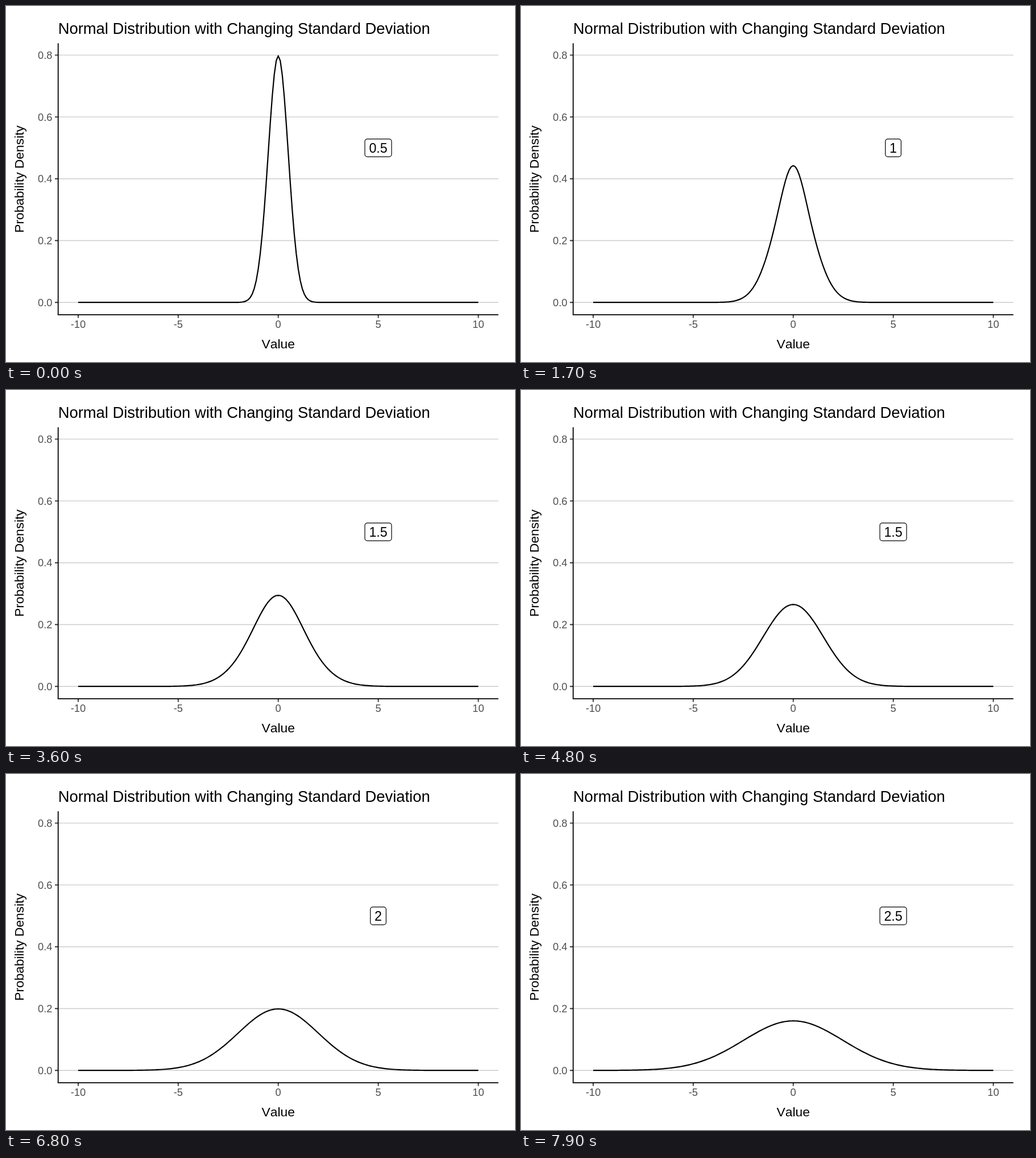
An HTML page for the animation above (8 s loop, 895 by 626 pixels).

```html
<!DOCTYPE html>
<html lang="en">
<head>
<meta charset="utf-8">
<title>Normal Distribution</title>
<style>
  html, body { margin: 0; height: 100%; overflow: hidden; background: #fff; }
  svg { display: block; width: 895px; height: 626px; }
  text { font: 22.8px "Liberation Sans", Arial, sans-serif; font-kerning: none; }
  .title { font-size: 27.36px; }
  .tick { font-size: 18.24px; fill: #4d4d4d; }
  .value { font-size: 23.17px; }
  .mid { text-anchor: middle; }
  .end { text-anchor: end; }
  path { fill: none; }
</style>
</head>
<body>
<svg viewBox="0 0 895 626">
  <path id="grid" stroke="#ccc" stroke-width="1.4"/>
  <path id="curve" stroke="#000" stroke-width="2.2" stroke-linejoin="round"/>
  <rect id="box" y="233.9" height="31.2" rx="4.4" fill="#fff" stroke="#000" stroke-width="1.2"/>
  <text id="value" class="value mid" x="654.5" y="257.8"></text>
  <path id="marks" stroke="#333" stroke-width="1.9"/>
  <path d="M91.7 65.6V542.9H865.8" stroke="#000" stroke-width="1.8"/>
  <g id="labels"></g>
  <text class="title" x="91.7" y="49">Normal Distribution with Changing Standard Deviation</text>
  <text class="mid" x="478.7" y="602">Value</text>
  <text class="mid" transform="translate(31.4 304.4) rotate(-90)">Probability Density</text>
</svg>
<script>
const $ = id => document.getElementById(id);
const X = v => 478.7 + v * 35.18;
const Y = d => 521.2 - d * 543.5;
const density = (x, sd) => Math.exp(-x * x / (2 * sd * sd)) / (sd * Math.sqrt(2 * Math.PI));

function drawAxes() {
  let grid = '', marks = '', labels = '';
  for (let i = 0; i < 5; i++) {
    const y = Y(i / 5), v = i * 5 - 10, x = X(v);
    grid += `M91.7 ${y}H865.8`;
    marks += `M86 ${y}H91.7M${x} 542.9V548.6`;
    labels += `<text class="tick end" x="81.4" y="${y + 6.5}">${(i / 5).toFixed(1)}</text>
      <text class="tick mid" x="${x}" y="566.4">${v}</text>`;
  }
  $('grid').setAttribute('d', grid);
  $('marks').setAttribute('d', marks);
  $('labels').innerHTML = labels;
}

// Each 2 s state holds, then blends into the next; the picture advances every 100 ms.
function draw(ms) {
  const step = Math.floor(ms % 8000 / 100);
  const state = Math.floor(step / 20);
  const length = state ? 13 : 14;
  const p = Math.max(0, (step % 20 - 20 + length) / length);
  const mix = (1 - Math.cos(Math.PI * p)) / 2;
  const from = (state + 1) / 2, to = from + 0.5;

  let d = '';
  for (let i = -100; i <= 100; i++) {
    const x = i / 10;
    const y = density(x, from) * (1 - mix) + density(x, to) * mix;
    d += (d ? 'L' : 'M') + X(x).toFixed(2) + ' ' + Y(y).toFixed(2);
  }
  $('curve').setAttribute('d', d);

  const sd = p < 0.5 ? from : to;
  const width = sd % 1 ? 47 : 27.7;
  $('value').textContent = sd;
  $('box').setAttribute('x', 654.5 - width / 2);
  $('box').setAttribute('width', width);
}

drawAxes();
const start = performance.now();
function tick() {
  draw(performance.now() - start);
  requestAnimationFrame(tick);
}
tick();
</script>
</body>
</html>
```
